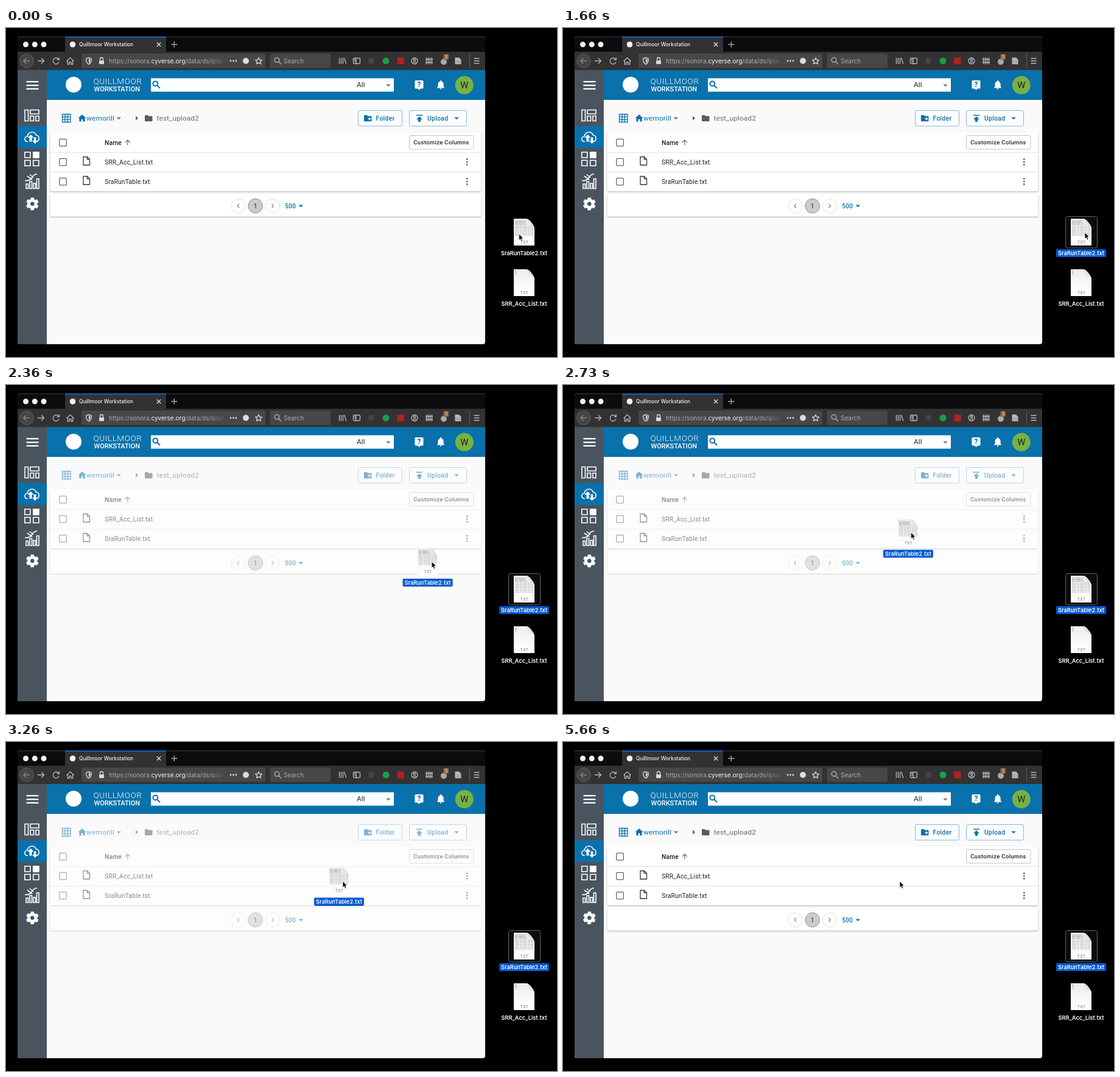
Recreate the animation shown at these times as an HTML page. Size 905 by 540 pixels, loop 8000 ms.

```html
<!DOCTYPE html>
<html lang="en">
<head>
<meta charset="utf-8">
<title>Drag and drop upload</title>
<style>
html, body { margin: 0; width: 100%; height: 100%; overflow: hidden; background: #000; }
svg { display: block; }
text { font-family: Roboto, sans-serif; font-size: 10.36px; letter-spacing: .12px; fill: #222; }
.ui, .label { font-family: Inter, sans-serif; letter-spacing: 0; }
.ui { font-size: 10px; fill: #f4f4f5; }
.label { font-size: 9.2px; font-weight: 600; fill: #fff; text-anchor: middle; }
.btn { font-weight: 500; letter-spacing: .3px; }
.crumb { font-size: 11.84px; }
.blue { fill: #0971ab; }
.line { fill: none; stroke-width: 1.3; }
.chrome { stroke: #b9b9bb; }
.side { stroke: #fff; stroke-width: 1.6; }
.card { fill: #fffffd; filter: drop-shadow(0 1px 1px rgba(0,0,0,.3)); }
#ghost .page { filter: drop-shadow(0 1px 3px rgba(0,0,0,.4)); }
</style>
</head>
<body>
<svg width="905" height="540" viewBox="0 0 905 540">
  <defs>
    <linearGradient id="paper" x1="0" y1="0" x2="0" y2="1">
      <stop offset="0" stop-color="#ededed"/><stop offset=".6" stop-color="#fafafa"/><stop offset="1" stop-color="#fff"/>
    </linearGradient>
    <linearGradient id="fade">
      <stop offset=".8" stop-color="#474749" stop-opacity="0"/><stop offset="1" stop-color="#474749"/>
    </linearGradient>
    <linearGradient id="fold" x1="0" y1="1" x2="1" y2="0">
      <stop offset="0" stop-color="#fff"/><stop offset="1" stop-color="#c8c8c8"/>
    </linearGradient>
    <path id="caret" d="M-3.7-1.8h7.4L0 1.9z"/>
    <path id="folder" d="M0 1.2Q0 0 1.2 0H4.6L6 1.5h5.3Q12.5 1.5 12.5 2.7V9q0 1.2-1.2 1.2H1.2Q0 10.2 0 9z"/>
    <g id="doc">
      <path class="page" fill="url(#paper)" d="M0 0H20Q24 0 28 5 34 12 34 16V44H0z"/>
      <path fill="url(#fold)" d="M20 0Q24 2 23 11 32 10 34 16 34 12 28 5 24 0 20 0z"/>
      <text class="ui" x="17.5" y="41.3" text-anchor="middle" style="font-size:6.6px;fill:#777;letter-spacing:.2px">TXT</text>
    </g>
    <g id="table">
      <use href="#doc"/>
      <g class="line" stroke="#8d8d96" stroke-width=".8">
        <path stroke-width=".9" stroke-dasharray="5 1 8 .8 3 1" d="M2 4H20M2 6.5H21M2 9H22"/>
        <path stroke-width=".8" stroke-dasharray="7 1 4 .8" d="M2 12H31M2 14.5H32M2 17H32M2 19.500H32M2 22H32M2 24.500H32M2 27H32" opacity=".75"/>
      </g>
    </g>
  </defs>

  <!-- browser window -->
  <rect x="19" y="14" width="768" height="505" rx="4" fill="#fafafb"/>
  <path fill="#0c0c0e" d="M19 39V18q0-4 4-4H783q4 0 4 4V39z"/>
  <path fill="#323234" d="M97 14H263V39H787V69H19V39H97z"/>
  <path class="line" stroke="#3c3c40" stroke-width="1" d="M21 14.500H785" style="stroke-width:1"/>
  <path fill="#0a84ff" d="M97 14h166v1.200H97z"/>
  <g fill="#f3f3f3"><circle cx="32.500" cy="27" r="4.500"/><circle cx="47.300" cy="27" r="4.500"/><circle cx="62" cy="27" r="4.500"/><circle cx="109.500" cy="27" r="4.800"/></g>
  <text class="ui" x="120" y="30.300" style="font-size:8.4px;font-weight:500">Quillmoor Workstation</text>
  <path class="line" stroke="#e0e0e0" d="M247.800 23.800l6.400 6.400m0-6.400l-6.400 6.400"/>
  <path class="line" stroke="#aaa" d="M276.300 22v10m-5-5h10"/>

  <rect x="124" y="42" width="302" height="23.500" rx="2.500" fill="#474749"/>
  <rect x="433.500" y="42" width="99.500" height="23.500" rx="2.500" fill="#474749"/>
  <circle cx="34" cy="54" r="11.300" fill="#454547" stroke="#606063"/>
  <g class="line chrome">
    <path stroke="#88888a" d="M39 54H29m4.300-4.500L28.800 54l4.500 4.500"/>
    <path d="M52 54h10.500m-4.500-4.500l4.500 4.500-4.500 4.500"/>
    <path d="M86.500 51.500A5 5 0 1 0 87 56M87.300 48.300v3.800h-3.800"/>
    <path d="M99.500 54.500l6-5.700 6 5.700M101.300 53v6.500h2.700v-3.500h3v3.500h2.700V53"/>
    <path stroke="#dcdcdd" d="M131.700 50.200l4.300-1.400 4.300 1.400c.3 4.500-1 7.700-4.300 9.300-3.300-1.600-4.600-4.800-4.300-9.300z"/>
    <path fill="#dcdcdd" stroke="none" d="M136 50.600l2.700.8c.1 3-.7 5.200-2.700 6.300z"/>
    <path stroke="#dcdcdd" d="M154.500 53.500v-2.500a2.500 2.500 0 0 1 5 0v2.500"/>
    <rect x="153" y="53.300" width="8" height="6" rx="1" fill="#dcdcdd" stroke="none"/>
    <path stroke="#dcdcdd" stroke-linejoin="round" d="M415 48.800l1.600 3.400 3.800.4-2.800 2.600.8 3.800-3.400-1.900-3.400 1.900.8-3.800-2.800-2.600 3.800-.4z"/>
    <circle cx="445" cy="52.500" r="3.800"/><path d="M448 55.500l4 4"/>
    <path d="M547.500 49v10m3-10v10m3-10v10m2-10l3.300 10"/>
    <rect x="570.500" y="49.500" width="11" height="9" rx="1.500"/><path d="M575 49.500v9M572 52h2m-2 2.500h2"/>
    <circle cx="671" cy="54" r="5"/><circle cx="671" cy="52.700" r="1.700"/><path d="M667.800 57.500q3.200-2.800 6.400 0"/>
    <path d="M690.500 48.500v11m3-11v11m3-11v11m3-11v11M689 51.500h12m-12 5h12"/>
    <path stroke="#58585b" d="M761.500 42v24"/>
    <path d="M768.500 50h9m-9 4h9m-9 4h9"/>
  </g>
  <circle cx="394" cy="54" r="5" fill="#dcdcdd"/>
  <g fill="#dcdcdd"><circle cx="369" cy="54" r="1.400"/><circle cx="373.500" cy="54" r="1.400"/><circle cx="378" cy="54" r="1.400"/></g>
  <circle cx="600" cy="54" r="5" fill="#454548"/>
  <circle cx="624" cy="54" r="5.500" fill="#18a046"/>
  <rect x="642.500" y="48.500" width="11" height="11" fill="#b5201e"/>
  <circle cx="719" cy="55.500" r="5" fill="#a9a9a9"/>
  <rect x="718.500" y="43" width="8.500" height="9" rx="1" fill="#9a6238"/>
  <text class="ui" x="722.800" y="50.200" text-anchor="middle" style="font-size:7px">3</text>
  <path fill="#b9b9bb" d="M737.500 48.500h6.500l3.500 3.500v7.500h-10z"/>
  <path class="line" stroke="#88888a" d="M739 54h7m-7 2.500h7" style="stroke-width:.8"/>
  <text class="ui" x="169" y="57.500" style="fill:#aaaaad">https://sonora.<tspan fill="#f9f9fa">cyverse.org</tspan>/data/ds/iplan</text>
  <rect x="210" y="44" width="152" height="20" fill="url(#fade)"/>
  <text class="ui" x="456" y="57.500" style="fill:#aaaaad">Search</text>

  <!-- header and sidebar -->
  <path fill="#0971ab" d="M67 69H787V118H67z"/>
  <path fill="#4a545f" d="M19 69H67V519H23q-4 0-4-4z"/>
  <path fill="#0971ab" d="M19 161H67v36H19z"/>
  <circle cx="111" cy="93" r="13" fill="#fff"/>
  <text x="143.500" y="91.500" style="font-size:13.5px;letter-spacing:.6px;fill:#fff;font-weight:300">QUILLMOOR</text>
  <text x="144.500" y="104" style="font-size:11px;letter-spacing:0;fill:#fff;font-weight:500">WORKSTATION</text>
  <path fill="#fff" d="M238 82.500H637V104.500H238z"/>
  <g class="line" stroke="#0971ab" style="stroke-width:2"><circle cx="245.300" cy="91.300" r="3.900"/><path d="M248.300 94.300l4.700 4.700"/></g>
  <text class="crumb" x="576" y="96.500">All</text>
  <use href="#caret" x="628" y="94.300" fill="#757575"/>
  <path fill="#fff" d="M673 86h11q1.500 0 1.500 1.500V98q0 1.500-1.500 1.500h-3.200L678.500 102l-2.300-2.500H673q-1.500 0-1.500-1.500V87.500q0-1.500 1.500-1.500z"/>
  <text x="678.500" y="97" text-anchor="middle" style="font-size:12px;font-weight:700;fill:#0971ab;letter-spacing:0">?</text>
  <path fill="#fff" transform="translate(705 84) scale(.76)" d="M12 22c1.100 0 2-.9 2-2h-4c0 1.100.89 2 2 2zm6-6v-5c0-3.070-1.640-5.640-4.500-6.320V4c0-.83-.67-1.500-1.500-1.500s-1.500.67-1.500 1.500v.68C7.630 5.360 6 7.920 6 11v5l-2 2v1h16v-1l-2-2z"/>
  <circle cx="752.800" cy="93.800" r="15" fill="#78b143"/>
  <text x="752.800" y="99" text-anchor="middle" style="font-size:14.800px;letter-spacing:0">W</text>

  <path fill="#fff" d="M33.500 87h20v2.300h-20zm0 5.900h20v2.300h-20zm0 5.900h20v2.300h-20z"/>
  <g class="line side">
    <path d="M31 134.500h5.500v18H31zM40 134.500h14v6.500H40zM40 144.500h5.500v8H40zM49 144.500h5v8h-5z"/>
    <path d="M36 186.500c-7 0-6.500-8.500-.8-8.700 1-8.500 12.500-8.800 14-2 6.500 0 6.300 10 .3 10.700"/>
    <path d="M30.800 203.800h9v9h-9zM44.800 203.800h9v9h-9z"/>
    <path d="M30.800 217.300h9v9h-9zM44.800 217.300h9v9h-9z"/>
    <path d="M33 256h3.500v7.500H33zM39 252h3.500v11.500H39zM45 255h3.500v8.500H45zM50.500 247.500H54v16h-3.500zM31 250.500q8 1 11-4.500t9-6.500M35 243l8 6M39 240.500l6 5"/>
  </g>
  <path fill="#fff" d="M44 203h10.500v10.500H44zM40.500 174.500l5 5.500h-3v6.500h-4V180h-3zM47.500 190l-4.500-5h2.700v-5.500h3.600v5.500H52z"/>
  <g class="line" stroke="#fff" transform="translate(43.300 288.700) rotate(-107.200)">
    <circle r="5.800" style="stroke-width:5"/><circle r="9" style="stroke-width:3" stroke-dasharray="5.400 4.025"/>
  </g>

  <!-- data page -->
  <g id="content">
    <path class="line" stroke="#0971ab" d="M92.500 141.500h13.500v13H92.500zm4.500 0v13m4.500-13v13M92.500 145.800H106m-13.500 4.400H106"/>
    <path class="blue" d="M125 142l6.500 6h-1.900v5.500h-3.300v-3.800h-2.600v3.800h-3.300V148h-1.900z"/>
    <text class="crumb blue" x="132" y="152" style="fill:#0971ab">wemorill</text>
    <use href="#caret" x="185.300" y="148.300" fill="#757575"/>
    <use href="#caret" transform="translate(215 148) rotate(-90)" fill="#555"/>
    <use href="#folder" x="228" y="143" fill="#5c5c5c"/>
    <text class="crumb" x="247.500" y="152" style="fill:#6a6a6a">test_upload2</text>
    <g fill="#fdfdfd" stroke="#84b8d5"><rect x="578.500" y="135.500" width="72" height="25.500" rx="2.500"/><rect x="662.500" y="135.500" width="94" height="25.500" rx="2.500"/></g>
    <use href="#folder" x="588" y="143" class="blue"/>
    <path class="line" stroke="#fff" d="M597 146.500v5m-2.500-2.500h5"/>
    <text class="btn" x="607.500" y="151.700" style="fill:#0971ab">Folder</text>
    <path class="blue" d="M674 142.500h10v1.500H674zM679 145l5 5h-3v4h-4v-4h-3z"/>
    <text class="btn" x="692" y="151.700" style="fill:#0971ab">Upload</text>
    <use href="#caret" x="740" y="148.300" class="blue"/>

    <rect class="card" x="72.500" y="171" width="708" height="97" rx="2"/>
    <path class="line" stroke="#e2e2e2" d="M73 204.500H780M73 236.500H780" style="stroke-width:1"/>
    <text x="162" y="191.500" style="font-weight:500">Name</text>
    <path class="line" stroke="#757575" d="M199.800 192.500v-8.500m-4 4l4-4 4 4"/>
    <rect x="662.500" y="176.500" width="105.500" height="22.500" rx="2.500" fill="#fff" stroke="#c4c4c4"/>
    <text class="btn" x="669.200" y="191.300" style="font-size:9.600px">Customize Columns</text>
    <rect class="line" stroke="#666" x="87.800" y="182.300" width="11.500" height="11.500" rx="1"/>
    <g id="rows"></g>

    <rect class="card" x="72.500" y="273" width="708" height="36.500" rx="2"/>
    <circle cx="381.500" cy="292" r="11.500" fill="none" stroke="#e0e0e0"/>
    <circle cx="438" cy="292" r="11.500" fill="none" stroke="#e0e0e0"/>
    <circle cx="409.700" cy="292" r="11.800" fill="#cbcbcb" stroke="#8e8e8e"/>
    <path class="line" stroke="#8a8a8a" d="M383 288.800l-3 3.200 3 3.200M436.500 288.800l3 3.200-3 3.200"/>
    <text x="409.800" y="295.500" text-anchor="middle">1</text>
    <text class="btn" x="458.300" y="295.500" style="font-size:10px;fill:#0971ab">500</text>
    <use href="#caret" x="484.300" y="292.300" class="blue"/>
  </g>

  <!-- desktop -->
  <g id="picked">
    <rect x="825.500" y="309.500" width="52" height="51.500" rx="3" fill="#0b0b0b" stroke="#626262"/>
    <rect x="810" y="363" width="82" height="13" rx="2" fill="#0058d0"/>
  </g>
  <use href="#table" x="834" y="313"/>
  <text class="label" x="851" y="372.800">SraRunTable2.txt</text>
  <use href="#doc" x="834" y="396"/>
  <path class="line" stroke="#a5a5a8" stroke-dasharray="1 .8" d="M837.500 398v7" style="stroke-width:2"/>
  <text class="label" x="851" y="455.800">SRR_Acc_List.txt</text>

  <g id="ghost">
    <use href="#table" x="834" y="313"/>
    <rect x="810" y="363" width="82" height="13" rx="2" fill="#0058d0"/>
    <text class="label" x="851" y="372.800">SraRunTable2.txt</text>
  </g>
  <path id="cursor" fill="#000" stroke="#fff" stroke-width=".8" d="M0 0V10.500L2.400 8.300 4.100 12.200 6 11.400 4.300 7.600H7.600z"/>
</svg>
<script>
const LOOP = 8000;
const $ = id => document.getElementById(id);

$('rows').innerHTML = ['SRR_Acc_List.txt', 'SraRunTable.txt'].map((name, i) => `
  <g transform="translate(0 ${220 + 32 * i})">
    <rect class="line" stroke="#666" x="87.8" y="-5.700" width="11.500" height="11.500" rx="1"/>
    <path class="line" stroke="#333" stroke-linejoin="round" d="M127-8.500h6.500l4 4V5H127zM133.300-8.300v4h4"/>
    <text x="162" y="3.500">${name}</text>
    <g fill="#666"><circle cx="757.300" cy="-4.500" r="1.400"/><circle cx="757.300" r="1.400"/><circle cx="757.300" cy="4.500" r="1.400"/></g>
  </g>`).join('');

// Each row is [ms, ...values]; two rows at one time make a hard change.
const play = (id, rows, style) => $(id).animate(
  rows.map(([ms, ...v]) => ({ offset: ms / LOOP, ...style(...v) })),
  { duration: LOOP, iterations: Infinity }
).startTime = 0;
const move = (x, y, easing = 'linear') => ({ transform: `translate(${x}px, ${y}px)`, easing });
const alpha = opacity => ({ opacity });

play('cursor', [
  [0, 842.5, 338], [30, 842.5, 338, 'ease-in-out'], [330, 826, 282],
  [530, 826, 282, 'ease-in-out'], [870, 847, 328.5],
  [1330, 847, 328.5, 'ease-in-out'], [1660, 857, 335.5],
  [1800, 857, 335.5, 'ease-in'], [2030, 750, 310.5], [2360, 699.5, 290],
  [2600, 604, 256.5], [2730, 571.5, 242, 'ease-out'], [3260, 553, 228.5], [LOOP, 553, 228.5]
], move);

play('ghost', [
  [0, 0, 0], [1840, 0, 0, 'ease-in'], [2030, -74, -15], [2360, -158, -45],
  [2600, -252, -79], [2730, -284, -92.5, 'ease-out'], [3260, -304, -107.5], [LOOP, -304, -107.5]
], move);

play('ghost', [
  [0, 0], [1840, 0], [1840, .5], [2030, .72], [2200, 1], [5560, 1], [5560, 0], [LOOP, 0]
], alpha);

play('picked', [[0, 0], [830, 0], [830, 1], [LOOP, 1]], alpha);

play('content', [
  [0, 1], [2150, 1], [2150, .52], [5620, .52], [5620, 1], [LOOP, 1]
], alpha);
</script>
</body>
</html>
```
